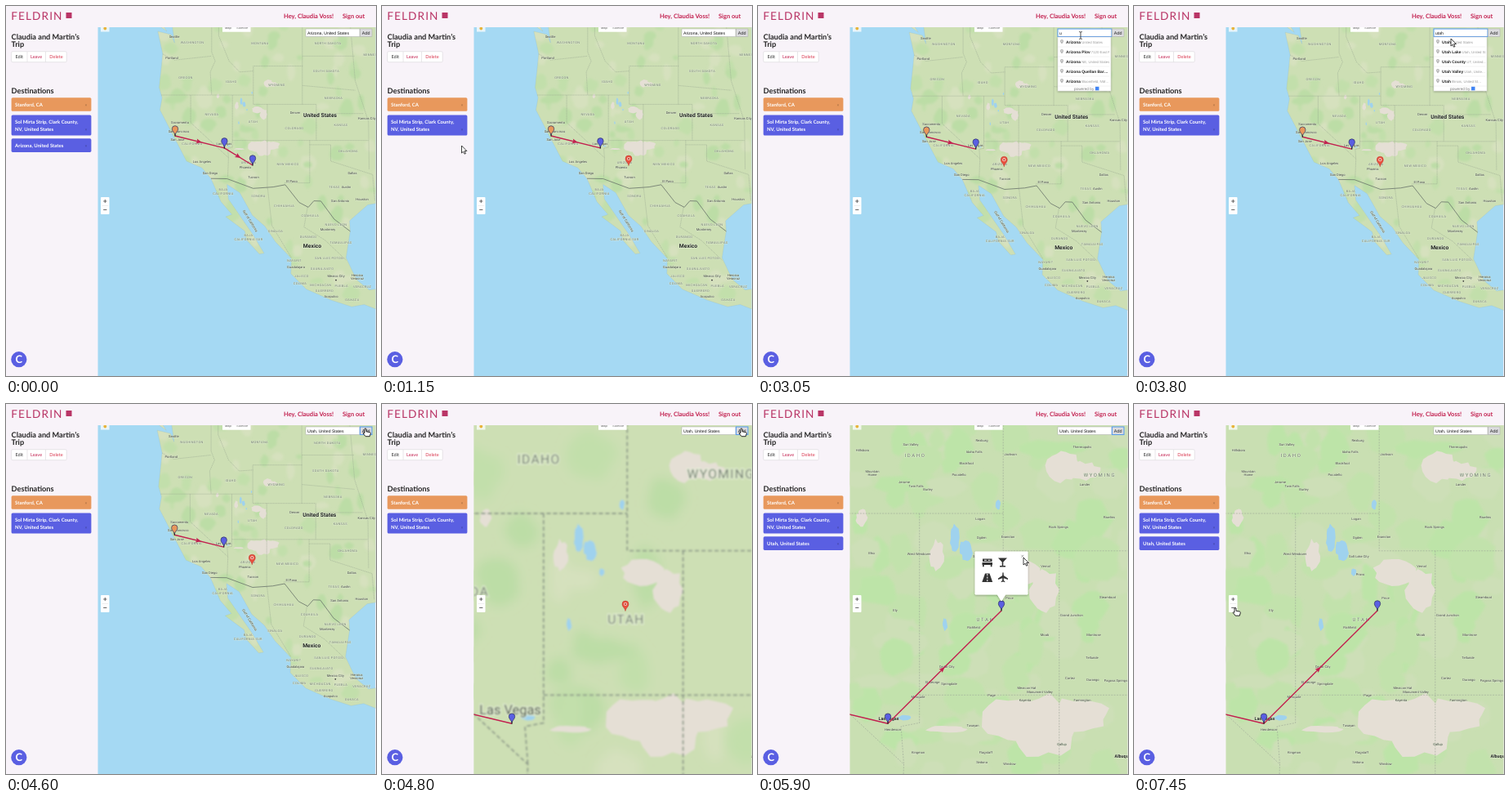
Recreate the animation shown at these times as an HTML page. Size 453x453 px, loop 7500 ms.

```html
<!DOCTYPE html>
<html lang="en">
<head>
<meta charset="utf-8">
<title>Trip planner</title>
<style>
html, body { margin: 0; width: 100%; height: 100%; overflow: hidden; background: #f8f3f9; }
svg { display: block; width: 100vw; height: 100vh; }
text { font-family: Lato, sans-serif; text-rendering: geometricPrecision; white-space: pre; }
.b { font-weight: 700; }
.ar { font-family: "Liberation Sans", Arial, sans-serif; }
.map text { font-family: Roboto, sans-serif; text-anchor: middle; paint-order: stroke; stroke: #e6f0d8; stroke-opacity: .7; }
.state { fill: #6d786b; }
.city { fill: #3c413b; }
.big { fill: #1f231f; font-weight: 700; }
</style>
</head>
<body>
<svg id="stage" viewBox="0 0 453 453" preserveAspectRatio="none"></svg>
<script>
const LOOP = 7500, RED = '#c2204f', BLUE = '#5a5fe2', ORANGE = '#e8985c', SEA = '#a5d9f3';
const stage = document.getElementById('stage');

// The close view is the wide one, four times larger
const zoom = ([x, y]) => [4 * x - 911, 4 * y - 302];
const mercator = (lon, lat) => [
  267.5 + 8.57 * (lon + 115.17),
  173.4 - 491 * (Math.asinh(Math.tan(lat * Math.PI / 180)) - .678)
];
const trace = points => 'M' + points.map(p => p.map(v => v.toFixed(1)).join(' ')).join('L');
const geo = (s, view = p => p) => s.split('/').map(part =>
  trace(part.trim().split(/\s+/).map(p => view(mercator(...p.split(',').map(Number)))))).join('');

const rect = (x, y, w, h, fill, more = '') =>
  `<rect x="${x}" y="${y}" width="${w}" height="${h}" fill="${fill}" ${more}/>`;
const text = (x, y, size, fill, str, more = '') =>
  `<text x="${x}" y="${y}" font-size="${size}" fill="${fill}" ${more}>${str}</text>`;
const path = (d, fill, more = '') => `<path d="${d}" fill="${fill}" ${more}/>`;
const line = (d, stroke, width, more = '') => path(d, 'none', `stroke="${stroke}" stroke-width="${width}" ${more}`);
const group = (id, body, more = '') => `<g id="${id}" ${more}>${body}</g>`;
const at = (x, y) => `transform="translate(${x} ${y})"`;

let seed = 7;
const rnd = () => (seed = seed * 16807 % 2147483647) / 2147483647;

// A ragged patch of ground
const patch = (x, y, rx, ry, n = 18) => trace(Array.from({ length: n }, (_, i) => {
  const a = i / n * 2 * Math.PI, r = .8 + .35 * rnd();
  return [x + rx * r * Math.cos(a), y + ry * r * Math.sin(a)];
})) + 'Z';
const mottle = (n, x, y, w, h, r, fills) => Array.from({ length: n }, (_, i) =>
  path(patch(x + rnd() * w, y + rnd() * h, r * (.4 + rnd()), r * (.4 + rnd()), 11), fills[i % fills.length])).join('');

// Names spread evenly from one point to another
const row = (cls, size, gap) => (names, x0, y0, x1 = x0, y1 = y0) => names.split('|').map((s, i, all) => {
  const u = all.length > 1 ? i / (all.length - 1) : 0;
  return `<text class="${cls}" x="${x0 + (x1 - x0) * u}" y="${y0 + (y1 - y0) * u + size * .35}" ` +
    `font-size="${size}" letter-spacing="${gap}" stroke-width="${size * .2}">${s}</text>`;
}).join('');
const state = row('state', 3.9, .35), city = row('city', 4.1, 0);
const closeState = row('state', 6, 1.6), closeBig = row('big', 5.4, 0), country = row('big', 6.8, 0);

const land = geo(`-122.8,49.6 -122.3,47.3 -122.8,48.1 -124.7,48.4 -124,46.2 -124.5,42.8 -124.1,41.7 -124.4,40.4
  -122.4,37.4 -120.6,34.6 -118.4,33.8 -117.1,32.5 -115.7,29.7 -114.1,28.1 -115,27.8 -112.3,26 -112,24.8
  -110.2,23 -109.5,23.1 -111.3,25.8 -114.6,30 -114.8,31.8 -113,30.8 -111.2,28 -109.4,26.6 -107.9,24.6
  -105.6,22.4 -105.7,20.4 -103.5,18.3 -99.9,16.8 -97,15.9 -95.2,16.2 -92,15 -92,18.5 -94.5,18.2 -96.3,19.6
  -97.8,22.5 -97.2,26 -97.3,27.3 -94.7,29.3 -92,29.7 -90,50 / -126,49.6 -123.4,48.4 -124.6,49.6`) + 'Z';
const borders = `-124,46.2 -122.3,45.6 -117,46 / -117,49 -117,46.4 -116.5,45.5 -117.2,44.4 -117,42
  / -116,49 -116,48 -114.5,45.5 -113,44.4 -111,44.5 / -124.2,42 -111.05,42
  / -120,42 -120,39 -114.6,35 -114.7,32.7 / -114.04,42 -114.04,36.2 -114.7,36.1 -114.6,35
  / -114.04,37 -94.6,37 / -104,45 -111.05,45 -111.05,41 -102.05,41 -102.05,37 / -104.05,49 -104.05,41
  / -109.05,41 -109.05,31.3 / -102.05,40 -95.3,40 / -104,43 -96.5,42.5 / -104,46 -96.6,46
  / -97.2,49 -96.5,43.5 -94.6,39.1 -94.5,33.6 / -103,37 -103,32 -106.6,32
  / -103,36.5 -100,36.5 -100,34.6 -94,33 -93.7,29.8
  / -109,31.3 -108.4,26.7 -105.6,22.5 / -103.3,29 -103.8,26.5 -100.8,24.8 -97.8,22.2`;
const frontier = `-117.1,32.53 -114.8,32.5 -111.07,31.33 -108.2,31.5 -106.5,31.78 -104.5,29.6 -103.2,29
  -102.4,29.8 -101.4,29.77 -99.5,27.5 -97.2,25.95`;

const sand = patch(312, 386, 38, 26) + patch(350, 395, 38, 38) + patch(392, 380, 36, 20) +
  patch(320, 207, 26, 17) + patch(350, 228, 17, 28) + patch(374, 75, 20, 20) + patch(398, 82, 20, 11) +
  patch(219, 186, 9, 19) + patch(230, 398, 24, 4) + patch(127, 139, 7, 10);
const lakes = patch(241, 164, 6, 17) + patch(255, 178, 8, 13) + patch(269, 206, 3, 5) + patch(229, 270, 3, 8) +
  patch(294, 123, 3, 6) + patch(179, 384, 8, 3);
const ground = path(sand, '#e5dfd5') + path(lakes, '#9fd2ee');

const wide =
  rect(100, 0, 353, 453, SEA) + path(land, '#cddfb4') +
  `<g clip-path="url(#shore)"><g filter="url(#smooth)">` +
    mottle(120, 190, 20, 265, 345, 8, ['#bcdda6', '#c2dfab', '#d6e1be']) + '</g>' +
    `<g transform="translate(227.75 75.5) scale(.25)">${ground}</g></g>` +
  line(land, '#8fbcd0', .3) + line(geo(borders), '#8d9a8a', .45, 'stroke-dasharray="1.3 .7"') +
  line(geo(frontier), '#69736a', .8) +
  state('WASHINGTON|MONTANA|NORTH DAKOTA', 228, 45, 394, 46) + state('OREGON|IDAHO|WYOMING', 220, 88, 331.5, 97) +
  state('SOUTH DAKOTA|NEBRASKA|KANSAS|OKLAHOMA', 392, 80, 419, 178) + state('NEVADA|UTAH|COLORADO', 252, 133, 353, 150) +
  state('ARIZONA|NEW MEXICO', 297, 192, 345, 194) + state('CALIFORNIA', 228, 169) + state('TEXAS', 402, 222) +
  state('MINNESOTA', 450, 60) + state('BAJA|CALIFORNIA', 266, 225, 266, 230) + state('BAJA|CALIFORNIA SUR', 297, 281, 297, 286) +
  state('SONORA|CHIHUAHUA|COAHUILA|NUEVO LEON', 309, 233, 404, 268) + state('SINALOA|DURANGO|TAMAULIPAS', 330, 276, 410, 290) +
  state('NAYARIT|SAN LUIS POTOSI', 353, 312, 396, 309) + state('JALISCO|GUANAJUATO', 362, 331, 387, 322) +
  state('COLIMA|MICHOACAN|PUEBLA|VERACRUZ', 360, 340, 436, 344) + state('GUERRERO|OAXACA', 390, 349, 424, 360) +
  city('Seattle|Portland', 206, 38, 203, 63.5) + city('Sacramento|San Francisco|San Jose', 213, 143, 210, 164) +
  city('Los Angeles|San Diego', 240, 191, 250, 205) + city('Phoenix|Tucson', 293, 198, 303, 210) +
  city('Denver|Kansas City', 354, 131, 442, 138) + city('Las Vegas', 267, 169) + city('El Paso', 350, 214.5) +
  city('Dallas|Austin|San Antonio', 424, 205, 409, 239) + city('Houston', 436, 237) +
  city('Monterrey|Guadalajara', 394, 274, 355, 320) + city('Mexico City|Acapulco', 404, 331, 398, 356) +
  city('Heroica|Veracruz', 430, 330, 430, 334) + country('United States', 384.5, 134) + country('Mexico', 375, 294) +
  '<circle cx="404" cy="335.6" r=".9" fill="#333"/>' +
  `<g transform="rotate(58 299 263)">${city('Gulf of California', 299, 263)}</g>`;

const close =
  rect(112, 26, 341, 427, '#c9dfb2') +
  `<g filter="url(#smooth)">${mottle(110, 112, 26, 341, 427, 21, ['#bde4a8', '#c2e2ac', '#cddfb7'])}</g>` + ground +
  line(geo(borders, zoom), '#9aa596', .6, 'stroke-dasharray="2 1.4"') +
  closeState('IDAHO', 192.5, 63) + closeState('WYOMING', 418.5, 86.5) + closeState('UTAH', 278.5, 263.5) +
  city('Rexburg|Idaho Falls|Blackfoot|Pocatello', 274, 45, 246, 87) + city('Jerome|Twin Falls|Burley', 179, 96, 208, 105) +
  city('Mountain|Home', 140, 83, 140, 87) + city('Hillsboro|Sun Valley', 128, 57, 187, 50) + city('Jackson', 309, 62) +
  city('Thermopolis|Lander', 397, 53, 400, 99) + city('Logan|Ogden|Salt Lake City|Provo', 272, 141, 277, 209) +
  city('Evanston|Rock Springs|Rawlins', 306, 163, 430, 139) + city('Elko|West Wendover', 139, 183, 197, 184) +
  city('Vernal|Steamboat', 352, 199, 428, 237) + city('Price|Grand Junction', 308, 238, 384, 259) + city('Ely', 168, 253) +
  city('Moab|Montrose', 351, 283, 411, 283) + city('Cedar City|St George|Mesquite', 231, 322, 196, 359) +
  city('Richfield|Springdale', 264, 274, 234, 343) + city('Telluride', 409, 311) +
  city('Cortez|Durango|Pagosa Springs', 382, 336, 438, 339) + city('Mexican Hat|Monument Valley', 329, 348, 345, 353) +
  city('Page|Kayenta', 286, 357, 327, 363) + city('Farmington|Gallup', 397, 363, 372, 417) +
  city('Henderson|Kingman', 165, 399, 196, 427) + city('Tusayan|Flagstaff', 263, 394, 279, 427) +
  city('Sedona|Winslow', 274, 439, 308, 441) + closeBig('Las Vegas', 160, 385) + closeBig('Albuquerque', 452, 431);

const pin = (id, [x, y], fill) => group(id, line('M0 .5V-5', '#222', 1.3) +
  path('M0 -1.2C-.7 -4 -3.7 -5.6 -3.7 -8.6A3.7 3.7 0 0 1 3.7 -8.6C3.7 -5.6 .7 -4 0 -1.2Z', fill,
    'stroke="#30315c" stroke-width=".7"'), at(x, y));
const marker = (id, [x, y]) => group(id,
  path('M0 .5C-.5 -3.500 -4 -4.500 -4 -8A4 4 0 0 1 4 -8C4 -4.500 .5 -3.500 0 .5Z', '#e8503f', 'stroke="#b3362b" stroke-width=".5"') +
  '<circle cy="-8" r="2.1" fill="#f6c3b8"/><circle cy="-8" r="1" fill="#b3362b"/>', at(x, y));
const leg = (id, [x1, y1], [x2, y2]) => {
  const turn = Math.atan2(y2 - y1, x2 - x1) * 180 / Math.PI;
  return group(id, line(`M${x1} ${y1}L${x2} ${y2}`, RED, 1.4) +
    path('M4 0L-3 -3L-1.6 0L-3 3Z', RED, `transform="translate(${x1 * .52 + x2 * .48} ${y1 * .52 + y2 * .48}) rotate(${turn})"`));
};

const bay = [207, 159], vegas = [267.4, 173.9], phoenix = [302, 195], utah = [298, 253];
const nearVegas = [159, 391.2];

const popup = path('M266 181H330V233H303L298 241L293 233H266Z', '#fff', 'stroke="#fff" stroke-linejoin="round" filter="url(#soft)"') +
  line('M322.3 184.8l3 3m0 -3l-3 3', '#777', .6) +
  path('M275 189.5h11.5V193H275ZM274.5 194H287v3H274.5ZM275 197h1.7v2.3H275ZM284.8 197h1.7v2.3h-1.7Z', '#333') +
  line('M277 191.3h3m1.5 0h3', '#fff', 1) +
  path('M294 188.5h11l-4.7 5V198h2.7v1.4h-7V198h2.7v-4.5Z', '#333') +
  path('M278 207.5h5.5L287.2 218H274.3Z', '#333') + line('M280.8 208v10', '#fff', 1, 'stroke-dasharray="2.2 1.3"') +
  path('M300 206q.8 0 .8 4L306 213.5V215L300.8 213.3V216l1.5 1.3v.9L300 217.5l-2.3 .7v-.9l1.5 -1.3V213.3L294 215V213.5L299.2 210Q299.2 206 300 206Z', '#333');

const card = (id, y, fill, ...lines) => {
  const h = 8.5 * (lines.length + 1);
  return group(id, rect(6.6, y, 97.8, h - .4, fill, 'rx="1.6"') +
    lines.map((s, i) => text(11, y + 10.7 + i * 8.4, 6, '#fff', s, 'class="b"')).join('') +
    text(96.5, y + h - 6, 5, '#000', '×', 'fill-opacity=".35"'));
};

const dropdown = (id, word, rests) => group(id, rests.map((rest, i) => {
  const [bold, dim] = rest.split('|');
  return `<g ${at(367, 44 + i * 12)}>` + (i ? line('M0 -6H65', '#e6e6e6', .5) : '') +
    path('M5 2.6Q3 0 3 -1A2 2 0 0 1 7 -1Q7 0 5 2.6Z', '#b3b3b3') + '<circle cx="5" cy="-1" r=".7" fill="#fff"/>' +
    `<text class="ar" x="10" y="1.7" font-size="4.9"><tspan class="b" fill="#222">${word + bold}</tspan>` +
    `<tspan font-size="4.3" fill="#999"> ${dim}</tspan></text></g>`;
}).join(''), 'clip-path="url(#menu)"');

const white = (d, width) => path(d, '#fff', `stroke="#111" stroke-width="${width}"`);
const arrow = white('M0 0V9L2.1 7.2L3.5 10.2L5 9.5L3.6 6.5H6.4Z', .8);
const hand = white('M-1 .5Q0 -.8 1 .5V3.8L5.5 4.6Q6.5 5 6.3 6.2L5.3 9.7H.2L-2.8 6Q-2.8 4.7 -1 5.7Z', .9);
const beam = line('M-1.8 -4.5Q0 -4.5 0 -3.5Q0 -4.5 1.8 -4.5M0 -3.5V3.5M-1.8 4.5Q0 4.5 0 3.5Q0 4.5 1.8 4.5', '#222', .8);

stage.innerHTML = `<defs>
<clipPath id="shore"><path d="${land}"/></clipPath>
<clipPath id="frame"><rect x="112.5" y="26" width="340" height="427"/></clipPath>
<clipPath id="band"><rect id="bandBox" x="112.5" y="26" width="340" height="148"/></clipPath>
<clipPath id="menu"><rect x="367" y="38" width="63.5" height="60"/></clipPath>
<filter id="smooth"><feGaussianBlur stdDeviation="1.6"/></filter>
<filter id="blur" x="0" y="0" width="1" height="1"><feGaussianBlur stdDeviation=".25"/></filter>
<filter id="soft" x="-.2" y="-.2" width="1.4" height="1.4"><feDropShadow dx="0" dy=".8" stdDeviation="1.2" flood-opacity=".35"/></filter>
</defs>` + rect(0, 0, 453, 453, '#f8f3f9') +
'<g clip-path="url(#frame)">' +
  group('wide', group('wideMap', wide, 'class="map"') + leg('legA', bay, vegas) + leg('legB', vegas, phoenix) +
    pin('p1', bay, ORANGE) + pin('p2', vegas, BLUE) + pin('p3', phoenix, BLUE) + marker('oldMark', phoenix)) +
  group('close', group('closeMap', close, 'class="map"') +
    group('stretch', '<use href="#wideMap" transform="matrix(4 0 0 4 -911 -302)" filter="url(#blur)"/>', 'clip-path="url(#band)"') +
    leg('legC', zoom(bay), nearVegas) + leg('legD', nearVegas, utah) +
    pin('p4', nearVegas, BLUE) + pin('p5', utah, BLUE) + marker('newMark', utah) + group('popup', popup)) +
  rect(265, 22, 34.5, 9.7, '#fff') + text(268, 28, 4, '#555', 'Map', 'class="ar"') + text(282, 28, 4, '#777', 'Satellite', 'class="ar"') +
  rect(116, 22, 10.5, 9.5, '#fff', 'fill-opacity=".75"') + '<circle cx="121.3" cy="27.5" r="1.9" fill="#e8b33c"/>' +
  rect(116, 234, 10.5, 21, '#fff', 'rx="1"') + line('M117.5 244.5h7.5', '#ddd', .5) +
  line('M119.2 239h4.2m-2.1 -2.1v4.2M119.2 249.5h4.2', '#555', .9) +
  rect(367, 28, 66, 9.5, '#fff', 'id="field"') + rect(368.8, 29.5, 52, 6.6, '#4a8ff0', 'id="sel"') +
  text(369, 34.7, 5.13, '#111', '', 'id="query" class="ar"') + rect(433.5, 28, 14.5, 9.5, '#dcdcdf', 'id="add"') +
  text(440.7, 34.7, 5.5, '#222', 'Add', 'class="ar" text-anchor="middle"') +
  group('menuBox', rect(367, 38, 65, 66, '#fff', 'stroke="#ccc" stroke-width=".4" filter="url(#soft)"') +
    dropdown('listA', 'Arizona', ['|United States', ' Plov|7120 East Fen…', '|NE, United States', ' Quellan Bar…|', '|Bloomfield, NM…']) +
    dropdown('listU', 'Utah', ['|United States', ' Lake|Utah, United St…', ' County|UT, United…', ' Valley|Utah, Unite…', '|Illinois, United St…']) +
    line('M367 98h65', '#e6e6e6', .5) + text(387, 102.6, 4.7, '#777', 'powered by', 'class="ar"') + rect(413, 98.8, 4.5, 4.5, '#4285f4')) +
'</g>' +
text(6.3, 17.4, 13.6, '#b93566', 'FELDRIN', 'letter-spacing="1.1"') + rect(73.5, 8, 7, 7, '#b93566') +
text(340, 15, 7.55, RED, 'Hey, Claudia Voss!', 'class="b"') + text(412, 15, 7.5, RED, 'Sign out', 'class="b"') +
text(6.6, 41, 9.2, '#222', 'Claudia and Martin’s', 'class="b"') + text(6.6, 50.3, 9.2, '#222', 'Trip', 'class="b"') +
rect(6.6, 55.7, 67.6, 13, '#fff', 'rx="1.5" stroke="#d9d5da" stroke-width=".6"') + line('M26 56v12.5M48.500 56v12.5', '#d9d5da', .6) +
text(11.5, 64.1, 5.6, '#333', 'Edit') + text(30, 64.1, 5.6, RED, 'Leave') + text(53.3, 64.1, 5.6, '#d8324a', 'Delete') +
text(6.6, 107, 9.2, '#222', 'Destinations', 'class="b"') +
card('c1', 112.2, ORANGE, 'Stanford, CA') + card('c2', 133.4, BLUE, 'Sol Mirta Strip, Clark County,', 'NV, United States') +
card('c3', 162.3, BLUE, 'Arizona, United States') + card('c4', 162.3, BLUE, 'Utah, United States') +
`<circle cx="15.8" cy="432.7" r="9.6" fill="${BLUE}"/>` + text(15.8, 437.4, 13, '#fff', 'C', 'class="b" text-anchor="middle"') +
group('cursor', group('arrow', arrow) + group('hand', hand) + group('beam', beam));

const el = {};
stage.querySelectorAll('[id]').forEach(n => el[n.id] = n);
const show = (id, on) => el[id].style.display = on ? '' : 'none';
const outline = (id, on) => {
  el[id].setAttribute('stroke', on ? '#5b9dee' : '#aaa');
  el[id].setAttribute('stroke-width', on ? 1.1 : .5);
};

// Pointer moves: start, end, target point
const rest = [307, 222];
const moves = [[50, 800, 97.5, 171], [1150, 1900, 418, 62], [1900, 2550, 395, 36], [3400, 3800, 388, 40],
  [4000, 4600, 440, 30], [5500, 5900, 325, 188], [6950, 7450, 124, 249.5]];
const ease = u => u * u * (3 - 2 * u);

function shapeAt(t) {
  const within = (a, b) => t >= a && t < b;
  if (within(2450, 3600)) return 'beam';
  return within(750, 1150) || within(3850, 4050) || within(4450, 5600) || t >= 7350 ? 'hand' : 'arrow';
}

function moveCursor(t) {
  let [x, y] = rest;
  for (const [a, b, tx, ty] of moves) {
    const u = ease(Math.min(1, Math.max(0, (t - a) / (b - a))));
    x += (tx - x) * u;
    y += (ty - y) * u;
  }
  show('cursor', t >= 50);
  el.cursor.setAttribute('transform', `translate(${x} ${y})`);
  for (const s of ['arrow', 'hand', 'beam']) show(s, s === shapeAt(t));
}

function queryAt(t) {
  if (t < 3050) return 'Arizona, United States';
  return t < 4000 ? 'utah'.slice(0, 1 + Math.floor((t - 3050) / 120)) : 'Utah, United States';
}

function draw(t) {
  const zoomed = t >= 4750, saved = t >= 5400, first = t < 1150;
  const picked = t >= 2850 && t < 3050;
  el.wide.setAttribute('transform', t < 1950 ? '' : 'translate(-.7 1.2)');
  // Opacity keeps the wide map available to the stretched copy
  el.wide.style.opacity = zoomed ? 0 : 1;
  show('close', zoomed);
  for (const id of ['legB', 'p3', 'c3']) show(id, first);
  for (const id of ['legD', 'p5', 'c4']) show(id, saved);
  show('oldMark', !first);
  show('newMark', !saved);
  show('stretch', zoomed && t < 5200);
  el.bandBox.setAttribute('height', t < 4900 ? 427 : 148);
  show('popup', t >= 4850 && t < 6950);

  el.query.textContent = queryAt(t);
  el.query.setAttribute('fill', picked ? '#fff' : '#111');
  show('sel', picked);
  show('menuBox', t >= 2750 && t < 4000);
  show('listA', t < 3350);
  show('listU', t >= 3350);
  outline('field', t >= 2550 && t < 4000);
  outline('add', t >= 4550 && t < 6350);
  moveCursor(t);
}

const start = performance.now();
function tick() {
  const t = (performance.now() - start) % LOOP;
  draw(Math.floor(t / 50) * 50);
  requestAnimationFrame(tick);
}
tick();
</script>
</body>
</html>
```
